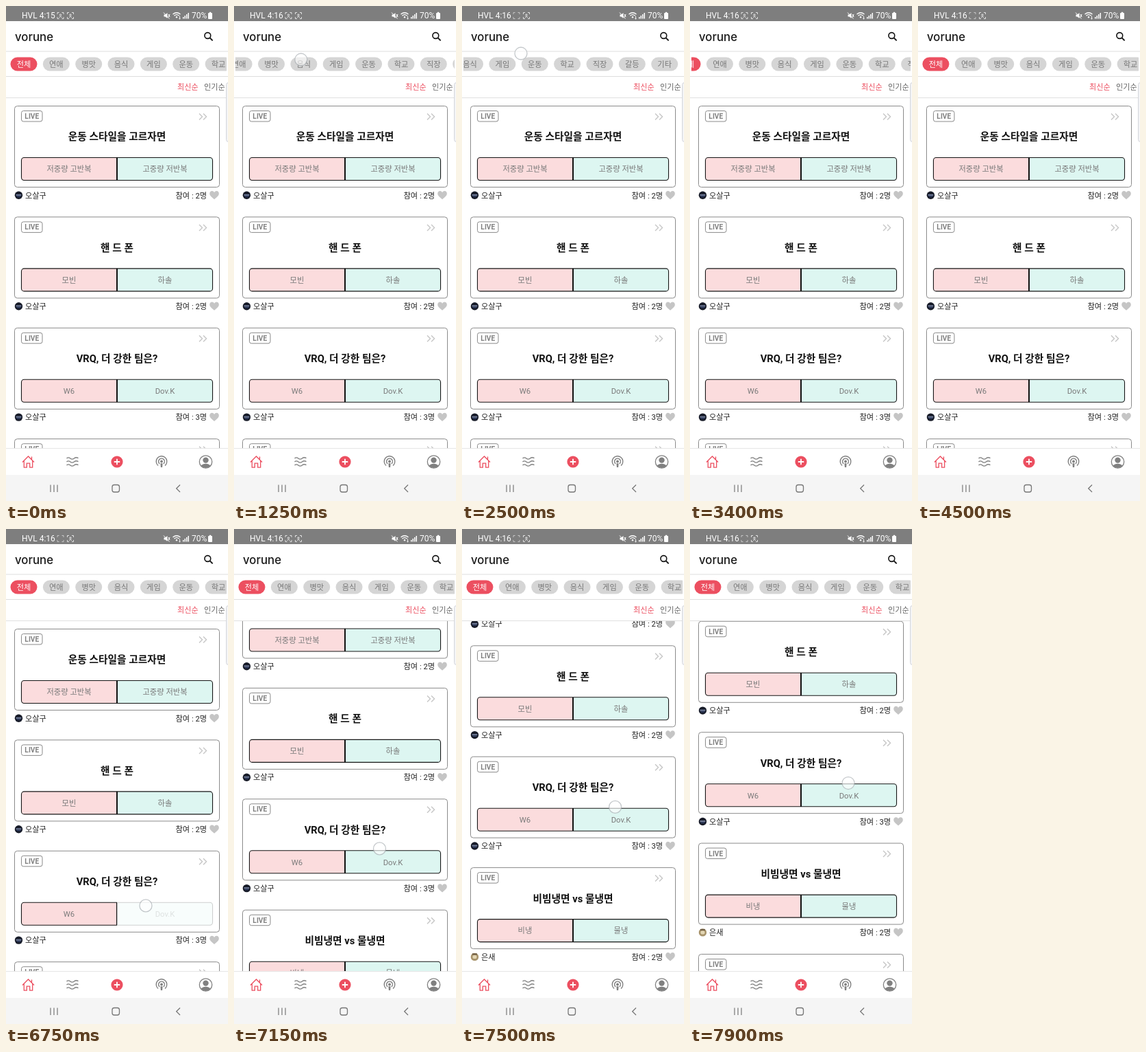
These frames come from a looping animation (324 px wide and 720 px high, 8000 ms). An HTML page with a canvas:

```html
<!DOCTYPE html>
<html lang="ko">
<head>
<meta charset="utf-8">
<style>
html, body { margin: 0; width: 100%; height: 100%; overflow: hidden; background: #fff; }
canvas { display: block; width: 324px; height: 720px; }
</style>
</head>
<body>
<canvas id="stage"></canvas>
<script>
const W = 324, H = 720, LOOP = 8000;
const canvas = document.getElementById('stage');
const ratio = window.devicePixelRatio || 1;
canvas.width = W * ratio;
canvas.height = H * ratio;
const c = canvas.getContext('2d');

const RED = '#ec4f60', GREY = '#808080';
const FONT = 'Roboto, "Noto Sans CJK KR", "Noto Sans CJK", sans-serif';

const chips = ['전체', '연애', '병맛', '음식', '게임', '운동', '학교', '직장', '갈등', '기타'];
const cards = [
  { title: '운동 스타일을 고르자면', a: '저중량 고반복', b: '고중량 저반복', user: '오살구', count: 2 },
  { title: '핸 드 폰', a: '모빈', b: '하솔', user: '오살구', count: 2 },
  { title: 'VRQ, 더 강한 팀은?', a: 'W6', b: 'Dov.K', user: '오살구', count: 3 },
  { title: '비빔냉면 vs 물냉면', a: '비냉', b: '물냉', user: '은새', count: 2, warm: true },
  { title: '', a: '', b: '', user: '', count: 2 }
];

// [time, value] keys
const chipKeys = [[900, 0], [1250, 66], [1500, 108], [1800, 138], [2200, 156.5],
  [2500, 156.5], [3000, 95], [3400, 30], [3750, 0]];
const listKeys = [[6750, 0], [6850, 9], [7150, 75.3], [7500, 137], [7900, 172.6], [8000, 174]];
const fadeKeys = [[6560, 1], [6710, 0.2], [6790, 0.2], [6960, 1]];

// Monotone cubic through the keys
function track(keys, t) {
  const n = keys.length - 1;
  if (t <= keys[0][0]) return keys[0][1];
  if (t >= keys[n][0]) return keys[n][1];
  const slope = i => (keys[i + 1][1] - keys[i][1]) / (keys[i + 1][0] - keys[i][0]);
  const tangent = i => {
    if (i === 0 || i === n) return 0;
    const p = slope(i - 1), q = slope(i);
    return p * q <= 0 ? 0 : 2 * p * q / (p + q);
  };
  let i = 0;
  while (t > keys[i + 1][0]) i++;
  const [t0, v0] = keys[i], [t1, v1] = keys[i + 1];
  const h = t1 - t0, u = (t - t0) / h, w = 1 - u;
  return v0 * (1 + 2 * u) * w * w + tangent(i) * h * u * w * w
    + v1 * u * u * (3 - 2 * u) - tangent(i + 1) * h * u * u * w;
}

function rect(x, y, w, h, color) {
  c.fillStyle = color;
  c.fillRect(x, y, w, h);
}

function box(x, y, w, h, r, fill, line, width = 1) {
  c.beginPath();
  c.roundRect(x, y, w, h, r);
  if (fill) { c.fillStyle = fill; c.fill(); }
  if (line) { c.strokeStyle = line; c.lineWidth = width; c.stroke(); }
}

function disc(x, y, r, fill, line, width = 1) {
  c.beginPath();
  c.arc(x, y, r, 0, Math.PI * 2);
  if (fill) { c.fillStyle = fill; c.fill(); }
  if (line) { c.strokeStyle = line; c.lineWidth = width; c.stroke(); }
}

function path(d, line, width, fill) {
  const p = new Path2D(d);
  if (fill) { c.fillStyle = fill; c.fill(p); }
  if (line) { c.strokeStyle = line; c.lineWidth = width; c.stroke(p); }
}

// y is the middle of the glyphs
function text(s, x, y, size, color, align = 'left', weight = 400, font = FONT) {
  c.font = `${weight} ${size}px ${font}`;
  c.textAlign = align;
  c.fillStyle = color;
  c.fillText(s, x, y + size * 0.36);
}

function clip(x, y, w, h, draw) {
  c.save();
  c.beginPath();
  c.rect(x, y, w, h);
  c.clip();
  draw();
  c.restore();
}

function at(x, y, draw) {
  c.save();
  c.translate(x, y);
  draw();
  c.restore();
}

function scanIcon(x, bright) {
  at(x, 14, () => {
    c.globalAlpha = bright ? 0.85 : 0.6;
    path('M-4.5-2V-4.5H-2M2-4.5H4.5V-2M4.5 2V4.5H2M-2 4.5H-4.5V2', '#fff', 0.9);
    if (bright) {
      disc(0, -0.9, 1.2, null, '#fff', 0.9);
      path('M-2.2 2.6Q0 0.2 2.2 2.6', '#fff', 0.9);
    }
  });
}

function statusBar(t) {
  rect(0, 0, W, 22, '#7e7e7e');
  text(t < 500 ? 'HVL 4:15' : 'HVL 4:16', 23, 14, 12, '#fff');
  scanIcon(79.5, t % 1000 < 480);
  scanIcon(94, true);
  at(234.5, 14, () => {
    path('M-4-1.6H-2L1-4V4L-2 1.6H-4Z', null, 0, '#fff');
    path('M2.6-2L4.6 2M4.6-2L2.6 2M-4.5-4.5L4 4.5', '#fff', 1);
  });
  at(249, 17, () => {
    path('M-5.5-5Q0-9.5 5.5-5M-3.6-2.8Q0-5.8 3.6-2.8', '#fff', 1.3);
    disc(0, -0.7, 1.2, '#fff');
    path('M4.5-2.5V2M3.2 0.8L4.5 2L5.8 0.8', '#fff', 0.8);
  });
  for (let i = 0; i < 4; i++) rect(258 + i * 2.5, 16 - i * 2, 1.5, 2.5 + i * 2, '#fff');
  text('70%', 271, 14, 12, '#fff');
  box(295, 10, 6, 9, 1, '#fff');
  rect(296.8, 8.8, 2.4, 1.5, '#fff');
}

function header(chipScroll) {
  rect(0, 22, W, 112, '#fff');
  text('vorune', 13, 44.5, 16.8, '#1b1b1b', 'left', 500, 'Inter, sans-serif');
  disc(294.3, 43, 4.4, null, '#111', 1.6);
  path('M297.6 46.3L301.6 50.3', '#111', 1.9);
  rect(0, 65.5, W, 1, '#dedede');
  clip(2, 70, 320, 30, () => {
    chips.forEach((name, i) => {
      const x = 6.5 + i * 47.35 - chipScroll;
      box(x, 74.5, 39, 20, 10, i ? '#d5d5d5' : RED);
      text(name, x + 19.5, 84.5, 11.2, i ? '#777' : '#fff', 'center', i ? 400 : 500);
    });
  });
  rect(0, 102, W, 1, '#dedede');
  text('최신순', 250, 118.3, 11.1, RED);
  text('인기순', 289, 118.3, 11.1, '#666');
  rect(0, 133, W, 1, '#e0e0e0');
}

function option(x, y, label, fill, corners, alpha) {
  c.save();
  c.globalAlpha = alpha;
  box(x + 0.5, y + 0.5, 139, 33, corners, fill, '#161616', 1.1);
  text(label, x + 70, y + 17.3, 11.3, '#7a7a7a', 'center');
  c.restore();
}

function avatar(y, warm) {
  disc(18.5, y, 5.7, warm ? '#a8946c' : '#171b28');
  if (warm) {
    box(15.5, y - 2.5, 6, 5, 2, '#e3d6b4');
    rect(15, y - 5, 7, 2, '#6e5d44');
  } else {
    rect(14.6, y - 1.4, 7.8, 2, '#6f7b99');
    rect(15.6, y + 1.2, 5.8, 1.3, '#34446f');
  }
}

function card(d, y, alpha) {
  box(12.5, y + 0.5, 299, 118, 4, '#fff', '#8b8b8b', 1);
  box(22.5, y + 7.5, 30.5, 15.5, 3, null, '#8a8a8a', 1);
  text('LIVE', 37.8, y + 15.4, 10.2, '#828282', 'center', 700);
  at(287, y + 16, () =>
    path('M-5-4.5L-0.5 0L-5 4.5M1-4.5L5.5 0L1 4.5', '#c6c6c6', 1.4));
  text(d.title, 162, y + 45.2, 14.7, '#111', 'center', 700);
  option(22, y + 75, d.a, '#fbdcdd', [4, 0, 0, 4], 1);
  option(162, y + 75, d.b, '#ddf6f1', [0, 4, 4, 0], alpha);
  avatar(y + 130.3, d.warm);
  text(d.user, 28, y + 130.5, 11.2, '#222');
  text(`참여 : ${d.count}명`, 293, y + 130.5, 11.2, '#222', 'right');
  at(304, y + 130, () =>
    path('M0 6.3C-3 3.8-6.8 1.2-6.8-2.2C-6.8-6.4-1.6-7.4 0-3.6C1.6-7.4 6.8-6.4 6.8-2.2C6.8 1.2 3 3.8 0 6.3Z',
      null, 0, '#c5c5c5'));
}

function list(scroll, pressed) {
  clip(0, 134, W, 509, () => {
    cards.forEach((d, i) =>
      card(d, 145 + i * 161.4 - scroll, i === 2 ? pressed : 1));
  });
}

function tabs() {
  rect(0, 643, W, 39, '#fff');
  rect(0, 643, W, 1, '#e6e6e6');
  at(32.5, 663, () =>
    path('M-8.5 0.5L0-8L8.5 0.5M-6.2-1.5V8.2H-2.2V2.2H2.2V8.2H6.2V-1.5M5-7.5V-3.5', RED, 1.3));
  at(97, 663, () => {
    for (const y of [-5, 0, 5])
      path(`M-8.5 ${y}Q-6 ${y - 2.2} -3.2 ${y}T2.4 ${y}T8.5 ${y - 0.3}`, GREY, 1.4);
  });
  disc(162, 663, 8.6, RED);
  path('M157.8 663H166.2M162 658.8V667.2', '#fff', 1.8);
  at(227, 663, () => {
    for (const r of [4.4, 7.8]) {
      c.beginPath();
      c.arc(0, -0.5, r, Math.PI * 0.72, Math.PI * 2.28);
      c.strokeStyle = GREY;
      c.lineWidth = 1.4;
      c.stroke();
    }
    disc(0, -0.5, 1.9, GREY);
    path('M-1.6 2.2H1.6L1.1 8H-1.1Z', null, 0, GREY);
  });
  at(291.5, 663, () => {
    disc(0, 0, 9.2, '#fff', GREY, 1.3);
    disc(0, -2.4, 4.2, GREY);
    path('M-7 5.8Q-4.5 2.8 0 2.8T7 5.8Q4 9 0 9T-7 5.8Z', null, 0, GREY);
  });
}

function systemBar() {
  rect(0, 682, W, 38, '#f5f5f5');
  path('M65 696.5V707M70 696.5V707M75 696.5V707', '#777', 1.2);
  box(155, 696.5, 10.5, 10.5, 3, null, '#777', 1.3);
  path('M254 696.5L248.7 701.8L254 707', '#777', 1.3);
}

function edgeHandle() {
  box(321.5, 111.5, 8, 86, 3, '#f4f4f6', '#d3d5da', 1);
}

// Finger position, or null while nothing touches the screen
function finger(t, chipScroll, listScroll) {
  if (t >= 860 && t < 1500) return [164 - chipScroll, 78];
  if (t >= 2440 && t < 3300) return [86 + 156.5 - chipScroll, 69];
  if (t >= 6540) {
    const slop = 9 * Math.min(1, Math.max(0, (t - 6750) / 100));
    const drift = listScroll / 172.6;
    return [204 + 27 * Math.pow(drift, 1.4), 548 - listScroll - slop * (1 - drift * 0.35)];
  }
  return null;
}

function draw(t) {
  const chipScroll = track(chipKeys, t);
  const listScroll = track(listKeys, t);
  c.setTransform(ratio, 0, 0, ratio, 0, 0);
  rect(0, 0, W, H, '#fff');
  list(listScroll, track(fadeKeys, t));
  statusBar(t);
  header(chipScroll);
  tabs();
  systemBar();
  edgeHandle();
  const touch = finger(t, chipScroll, listScroll);
  if (touch) disc(touch[0], touch[1], 9, 'rgba(255,255,255,0.6)', 'rgba(165,170,175,0.65)', 1.3);
}

function tick() {
  draw(performance.now() % LOOP);
  requestAnimationFrame(tick);
}
tick();
</script>
</body>
</html>
```
